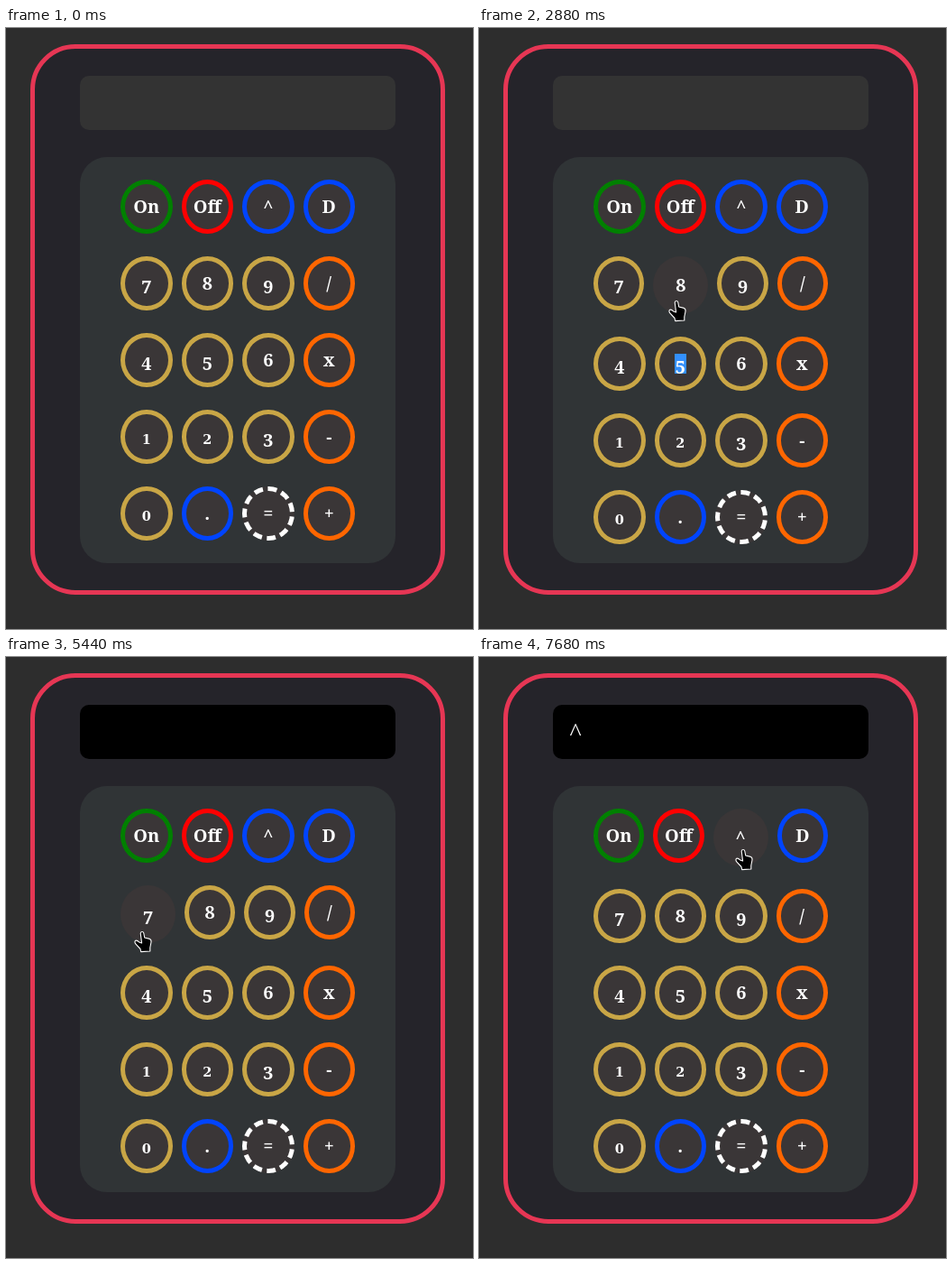
These frames come from a looping animation (518x666 px, 8 s). An HTML page:

```html
<!DOCTYPE html>
<html lang="en">
<head>
<meta charset="utf-8">
<title>Calculator</title>
<style>
  html, body { margin: 0; width: 100%; height: 100%; overflow: hidden; background: #2d2d2d; }
  div, svg { position: absolute; box-sizing: border-box; }
  #case { left: 27px; top: 18px; width: 460px; height: 610px; border: 5px solid #e63654; border-radius: 50px; background: #25242a; }
  #screen { left: 82px; top: 53px; width: 350px; height: 60px; border-radius: 10px; background: #333;
    color: #fff; font-family: "Liberation Serif", serif; line-height: 1; }
  #screen.on { background: #000; }
  #result { right: 0; top: 2px; font-size: 50px; }
  #operator { left: 18.5px; top: 16px; font-size: 28px; }
  #pad { left: 82px; top: 143px; width: 350px; height: 450px; border-radius: 30px; background: #303436; }
  .key { display: flex; align-items: center; justify-content: center; border: 5px solid; border-radius: 50%;
    background: #3a3637; font: bold 20px "Noto Serif", serif; }
  .key.hover { border: 0; }
  .key.selected::before { content: ""; position: absolute; inset: 0; margin: auto; width: 13px; height: 22px; background: #3390ff; }
  .key span { position: relative; top: -.5px; color: #fff; }
  .key .low { top: 3.5px; }
  .key .small { top: 2px; font: bold 14.5px "DejaVu Serif", serif; }
  svg { left: 0; top: 0; width: 518px; height: 666px; }
</style>
</head>
<body>
<div id="case"></div>
<div id="screen"><div id="result"></div><div id="operator"></div></div>
<div id="pad"></div>
<div id="keys"></div>
<svg><path id="cursor" stroke="#fff" stroke-width="1.1" stroke-linejoin="round"/></svg>
<script>
const LOOP = 8000, STEP = 40;
const COLORS = { On: 'green', Off: 'red', '^': '#04f', D: '#04f', '.': '#04f', '=': '#fff' };
const LABELS = 'On Off ^ D 7 8 9 / 4 5 6 x 1 2 3 - 0 . = +'.split(' ');
const ARROW = 'M.5 .5V17.5L4.5 14L7 19.5L9.5 18.4L7.2 13H12Z';
const HAND = 'M-.8 2C-.4 0 2.4 0 2.8 2L3.7 7L9.3 8.4Q11.4 9.2 11 12L9.8 18V22L-.3 22.6L-1 19.5L-6 14.2Q-8 11.5 -6.3 10.3Q-4.6 9.5 -2.4 12L.6 13Z';

// Cursor path: time, x, y
const PATH = [
  [520, 88, 2], [840, 110, 158], [960, 124, 188], [1200, 124, 188], [1400, 127, 222],
  [1920, 229, 352], [2720, 229, 352], [2960, 214, 285], [3560, 214, 285], [3680, 185, 242],
  [4080, 152, 203], [5200, 152, 203], [5240, 155, 227], [5720, 142, 362], [6680, 142, 362],
  [7240, 292, 213], [LOOP, 292, 213]
];
const $ = id => document.getElementById(id);

const keys = LABELS.map((label, i) => {
  const key = document.createElement('div');
  const text = document.createElement('span');
  key.className = 'key';
  key.style.borderColor = COLORS[label] || (/\d/.test(label) ? '#c9a646' : '#f60');
  if (label === '=') key.style.borderStyle = 'dashed';
  text.className = /[34579]/.test(label) ? 'low' : /[012]/.test(label) ? 'small' : '';
  text.textContent = label;
  key.append(text);
  $('keys').append(key);
  return { key, label, col: i % 4, row: i >> 2 };
});

// Monotone cubic interpolation along one axis of PATH
function along(t, axis) {
  const slope = i => PATH[i] && PATH[i + 1] ? (PATH[i + 1][axis] - PATH[i][axis]) / (PATH[i + 1][0] - PATH[i][0]) : 0;
  const tangent = i => {
    if (i === 0) return slope(0);
    const a = slope(i - 1), b = slope(i);
    return a * b > 0 ? 2 * a * b / (a + b) : 0;
  };
  const i = Math.max(0, PATH.findIndex(p => p[0] > t) - 1);
  const span = PATH[i + 1][0] - PATH[i][0], u = (t - PATH[i][0]) / span, v = 1 - u;
  return PATH[i][axis] * v * v * (1 + 2 * u) + PATH[i + 1][axis] * u * u * (3 - 2 * u)
    + span * u * v * (tangent(i) * v - tangent(i + 1) * u);
}

function layout(hovered, selecting) {
  for (const k of keys) {
    const hover = k === hovered, sameRow = hovered && k.row === hovered.row;
    const width = sameRow ? (hover ? 61 : 169 / 3) : 57.5;
    const pushX = sameRow && k.col > hovered.col ? 61 - 169 / 3 : 0;
    const base = sameRow ? 169 / 3 : 57.5;
    Object.assign(k.key.style, {
      left: 127 + k.col * (base + 10) + pushX + 'px',
      top: 168 + k.row * 85 + (hovered && k.row > hovered.row ? 4 : 0) + 'px',
      width: width + 'px',
      height: (hover ? 64 : 60) + 'px'
    });
    k.key.classList.toggle('hover', hover);
    k.key.classList.toggle('selected', selecting && k.label === '5');
  }
}

function draw(now) {
  const t = Math.floor(now % LOOP / STEP) * STEP;
  const visible = t >= 520;
  const x = Math.round(along(Math.max(t, 520), 1)), y = Math.round(along(Math.max(t, 520), 2));
  const hovered = visible && keys.find(k =>
    Math.hypot((x - 155.75 - k.col * 67.5) / 28.75, (y - 198 - k.row * 85) / 30) < 1);

  layout(hovered, t >= 2440 && t < 3240);
  $('screen').className = t >= 4520 ? 'on' : '';
  $('result').textContent = t >= 6280 && t < 7680 ? '4' : '';
  $('operator').textContent = t >= 7680 ? '^' : '';
  $('cursor').setAttribute('d', hovered ? HAND : ARROW);
  $('cursor').setAttribute('transform', `translate(${x} ${y})`);
  $('cursor').style.display = visible ? '' : 'none';
}

const start = performance.now();
function tick() {
  draw(performance.now() - start);
  requestAnimationFrame(tick);
}
tick();
</script>
</body>
</html>
```
